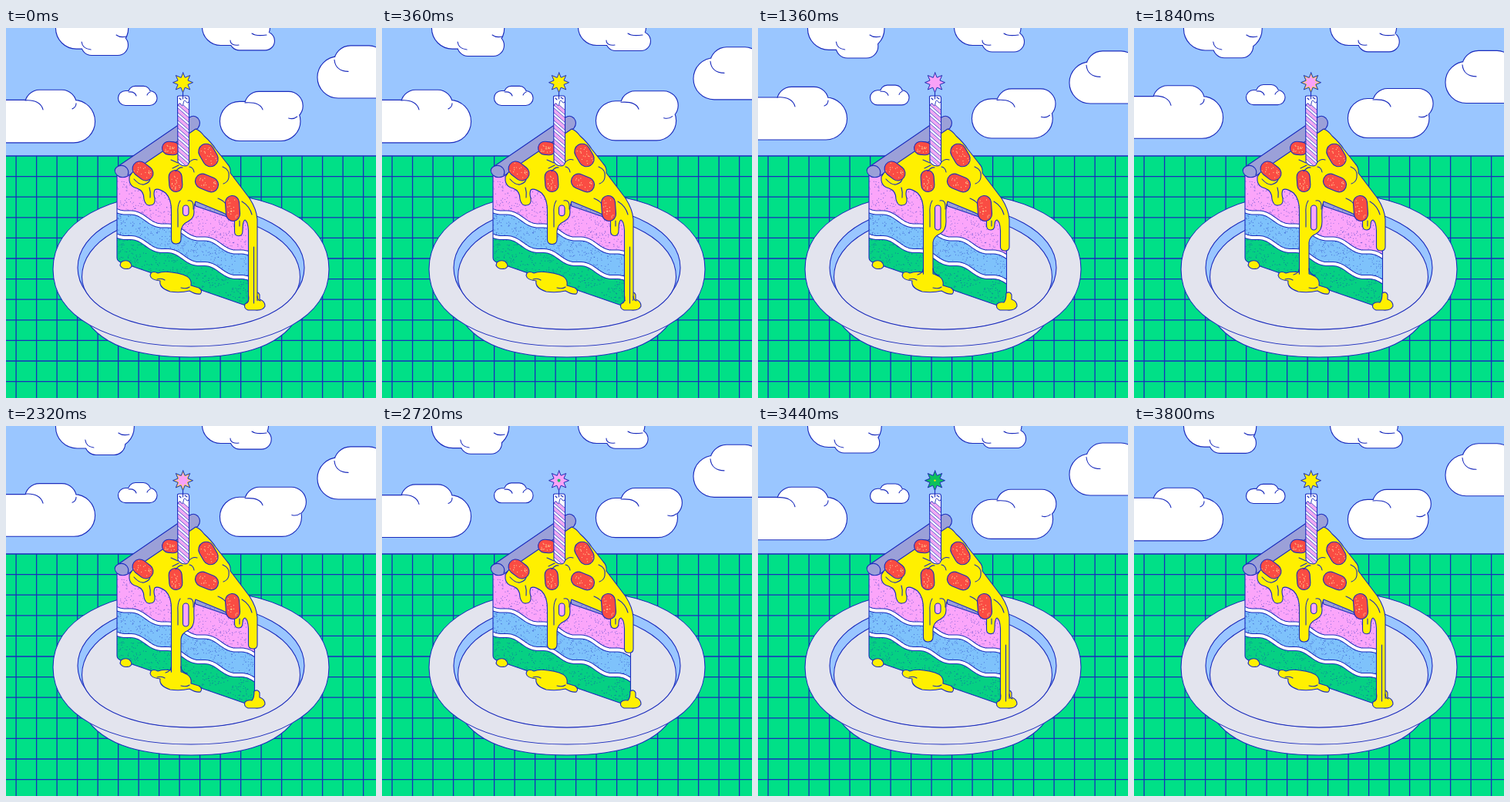
Write an HTML page with a canvas that moves like this. It is 480 by 480 pixels and loops after 3.84 s.

```html
<!DOCTYPE html>
<html lang="en">
<head>
<meta charset="utf-8">
<title>Pizza cake</title>
<style>
html, body { margin: 0; width: 100%; height: 100%; overflow: hidden; background: #9ac6ff; }
canvas { display: block; width: 480px; height: 480px; }
</style>
</head>
<body>
<canvas id="stage" width="480" height="480"></canvas>
<script>
const ctx = document.getElementById('stage').getContext('2d');
const LOOP = 3840, STEP = 40, TAU = Math.PI * 2;
const INK = '#1b2cbd', SKY = '#9ac6ff', GRASS = '#00e087', PLATE = '#e3e4ee';
const YELLOW = '#fff000', PINK = '#fba5fa', BLUE = '#7ec2fb', MINT = '#06d083';
const RED = '#fa4c43', CRUST = '#9ba0d8';

ctx.lineJoin = ctx.lineCap = 'round';

function paint(shape, fill, width = 1.1) {
  const path = typeof shape === 'string' ? new Path2D(shape) : shape;
  if (fill) { ctx.fillStyle = fill; ctx.fill(path); }
  if (width) { ctx.strokeStyle = INK; ctx.lineWidth = width; ctx.stroke(path); }
}

function seeded(seed) {
  return () => (seed = (seed * 16807) % 2147483647) / 2147483647;
}

// 0 at `shift` ms, 1 half a loop later
const sway = (t, shift) => (1 - Math.cos((t - shift) / LOOP * TAU)) / 2;

function tween(t, stops) {
  for (let i = 1; i < stops.length; i++) {
    const [t0, a] = stops[i - 1], [t1, b] = stops[i];
    if (t <= t1) return a + (b - a) * (1 - Math.cos(Math.PI * (t - t0) / (t1 - t0))) / 2;
  }
  return stops[stops.length - 1][1];
}

// Each puff is a pill given by left, top, right, bottom
function cloud(puffs, folds) {
  const path = new Path2D();
  for (const [l, top, r, b] of puffs) path.roundRect(l, top, r - l, b - top, (b - top) / 2);
  paint(path, null, 2.2);
  ctx.fillStyle = '#fff';
  ctx.fill(path);
  paint(folds, null);
}

function drawClouds(t) {
  const p = sway(t, 180), q = sway(t, -420), s = sway(t, -170), r = sway(t, 580);

  cloud([[65, -26, 158 + 8 * p, 26.5 + 2 * p], [98 + 5 * p, 9, 158 - 4 * p, 34.5 + 4 * q]],
    `M${98 + 5 * p} 18 Q${99 + 5 * p} 27 ${110 + 4 * p} 28 M${143 + 3 * p} 9 Q${148 + 3 * p} 13 ${156 + 4 * p} 11`);

  cloud([[255, -25, 342 - 2 * p, 22], [291, 5, 348 - 4.5 * p, 28 + 2.5 * q]],
    'M291 16 C291 21 296 23 302 22 M319 7 Q324 11 338 9');

  const y = 22.5 + 8 * q;
  cloud([[404.5, y + 14, 530, y + 67], [426, y, 492, y + 42]],
    `M426 ${y + 18} C427 ${y + 28} 434 ${y + 33} 444 ${y + 33}`);

  const top = 81 - 6 * p;
  cloud([[-40, 94 - 5 * p, 115, 148.5 - 6 * p], [25, top, 91, top + 37]],
    `M25 ${top + 13} C38 ${top + 12} 46 ${top + 17} 48 ${top + 25}
     M91 ${top + 17} Q91 ${top + 22} 86 ${top + 24}`);

  const dy = -4 * s, edge = 383.5 + 5.5 * r;
  cloud([[278, 96 + dy, 381 + 2 * r, 146 + dy], [310, 83 + dy, edge, 119 + dy / 2]],
    `M310 ${97 + dy} C324 ${96 + dy} 331 ${100 + dy} 333 ${106 + dy}
     M${edge - 7} ${115 + dy / 2} Q${edge - 12} ${119 + dy / 2} ${edge - 18} ${117 + dy / 2}`);

  cloud([[146, 82 - p, 195.5, 100 - p], [159, 76 - 2 * p, 187, 93 - p]],
    `M159 ${83 - p} Q167 ${82 - p} 169 ${88 - p} M187 ${83 - p} Q184 ${84 - p} 183 ${87 - p}`);
}

// Oval around x = 240; `k` sets how full its shoulders are
function oval(rx, cy, top, bottom, k) {
  const x = 240 - rx, right = 240 + rx, up = cy - (cy - top) * k, down = cy + (bottom - cy) * k;
  return `M${x} ${cy} C${x} ${up} ${240 - rx * k} ${top} 240 ${top} S${right} ${up} ${right} ${cy}
    C${right} ${down} ${240 + rx * k} ${bottom} 240 ${bottom} S${x} ${down} ${x} ${cy}Z`;
}

function drawTable() {
  ctx.fillStyle = GRASS;
  ctx.fillRect(0, 166, 480, 314);
  let lines = '';
  for (let x = 13.1; x < 480; x += 26.5) lines += `M${x} 166V480`;
  for (let y = 166; y < 480; y += 26.6) lines += `M0 ${y}H480`;
  paint(lines, null, 1.3);

  paint('M98 368 C118 412 170 427 240 427 S362 412 382 368Z', PLATE);
  paint(oval(179, 313, 213, 413, 0.61), PLATE);
  paint(oval(147, 311, 230, 391, 0.57), SKY);
  paint(oval(141.5, 323, 242, 391, 0.57), PLATE);
}

const waveY = (x, base) => base + 0.355 * (x - 144) - 2.8 * Math.sin((x - 158) / 48 * TAU);

function wave(base) {
  let path = `M144 ${waveY(144, base)}`;
  for (let x = 147; x <= 321; x += 3) path += `L${x} ${waveY(x, base)}`;
  return path + `L322.500 ${waveY(322.5, base)}`;
}

const FACE = new Path2D('M144 191 L160 190 L246 220 L322.500 247 V364 L149 304 Q144 302 144 298Z');
const WAVES = [wave(234.5), wave(267)];
const SPECKS = new Path2D();
{
  const rnd = seeded(77);
  for (let i = 0; i < 1200; i++) {
    const x = 144 + rnd() * 179, y = 192 + (x - 144) * 0.34 + rnd() * 112;
    SPECKS.rect(x, y, 0.9, 0.9);
  }
}

function drawSlice() {
  paint(FACE, PINK, 0);
  ctx.save();
  ctx.clip(FACE);
  paint(WAVES[0] + 'V380H144Z', BLUE, 0);
  paint(WAVES[1] + 'V380H144Z', MINT, 0);
  paint('M243 219 L318 242 L316 251 Q306 240 296 248 L246 231Z', CRUST);
  ctx.fillStyle = 'rgba(27,44,189,.6)';
  ctx.fill(SPECKS);
  for (const line of WAVES) {
    paint(line, null, 6);
    ctx.strokeStyle = '#fff';
    ctx.lineWidth = 4;
    ctx.stroke(new Path2D(line));
  }
  ctx.restore();
  paint(FACE);

  paint('M143 181 L238 116 Q244 112 249 117 Q254 123 249 130 L158 192 Q150 196 144 191 Q139 185 143 181Z', CRUST);
  paint('M146 179 Q153 177 157 182 Q160 186 158 191', null);
}

function drawPuddles() {
  paint('M149 304 Q154 300 160 303 Q166 309 160 312 Q151 314 148 308Z', YELLOW);
  paint('M188 318 Q191 315 197 318 Q204 315 215 317 Q233 319 238 325 Q241 329 240 334 L250 337 Q256 341 252 345 Q246 346 238 341 Q226 344 213 342 Q198 337 200 328 Q188 327 187 321Z', YELLOW);
  paint('M196 326 Q202 324 206 327 M227 337 Q234 339 238 336', null);
  paint('M322 344 Q327 341 329 346 V352 Q336 354 336 361 Q333 367 323 366 H314 Q308 364 310 358 Q313 355 319 356 Q322 353 322 344Z', YELLOW);
}

function drawCheese(t) {
  const mid = tween(t, [[0, 280], [320, 280], [720, 301], [1080, 327], [2440, 327], [2840, 280], [LOOP, 280]]);
  const right = tween(t, [[0, 359], [280, 359], [720, 320], [1200, 289], [2560, 289], [3120, 317], [3480, 359], [LOOP, 359]]);
  const web = tween(t, [[0, 0], [320, 0], [1200, 1], [2160, 1], [2920, 0], [LOOP, 0]]);
  const tip = 262 + (right - 289) / 9;

  const body = new Path2D(`M160 193 Q165 183 181 175 L246 131 Q252 133 257 140
    Q267 149 272 157 L287 176 Q292 181 291 188 L316 221 Q325 235 326 248
    V${right - 5} Q326 ${right} 320.500 ${right} Q314.500 ${right} 314.500 ${right - 5}
    V263 Q314 251 310 249 Q307 250 307 ${tip - 7} Q307 ${tip} 302 ${tip} Q296 ${tip} 296.500 ${tip - 7} V248
    Q288 243 280 239 L246 225 Q243 232 244 ${239 + 12 * web}
    Q244 ${247 + 16 * web} 236 ${251 + 16 * web} Q227.500 ${255 + 16 * web} 227 ${264 + 14 * web}
    V${mid - 6} Q227 ${mid} 220.500 ${mid} Q214.500 ${mid} 214.500 ${mid - 6}
    V239 Q215 222 207 214 Q197 207 193 210 Q191 214 193 221 Q194 230 187 230
    Q181 231 179 222 Q179 211 170 208 Q161 206 160 198Z`);
  paint(body, YELLOW);

  ctx.fillStyle = YELLOW;
  if (mid > 317) {
    const flare = Math.min(1, (mid - 317) / 8);
    ctx.beginPath();
    ctx.ellipse(221, 326, 13 * flare, 7.5, 0, 0, TAU);
    ctx.fill();
    paint('M214.500 312 Q214 318 207 320 M227 312 Q227 319 235 321', null);
  }
  if (right > 352) {
    ctx.beginPath();
    ctx.ellipse(321, 358.5, 8, 6, 0, 0, TAU);
    ctx.fill();
    paint('M314.500 347 Q316 354 312 357 M326 348 Q326 353 330 354 M321.500 284 V357', null);
  }

  const hole = new Path2D();
  hole.roundRect(229.5, 230, 7.5, 13.5 + 18.5 * web, 3.7);
  paint(hole, PINK);
  paint(`M226 224 Q222 230 223 242 V258 M236 224 Q244 222 243 235
    M166 196 Q173 204 179 203 Q188 200 187 194 M186 207 Q188 213 187 220
    M281 180 Q291 184 289 194 Q288 200 282 202 M306 225 Q316 231 319 242
    M275 221 Q282 224 284 227 M303 250 V257`, null);
}

// x, y, length, thickness, angle
const SAUSAGES = [
  [177.5, 185.5, 29, 19, 0.65], [214, 156, 23, 17, 0.1], [220, 198.5, 28, 17, 1.5],
  [262.5, 165, 31, 20, 1.05], [260.5, 201, 31, 19, 0.4], [294, 234, 33, 18, 1.5]
];

function drawSausages() {
  const rnd = seeded(31);
  for (const [x, y, len, thick, angle] of SAUSAGES) {
    ctx.save();
    ctx.translate(x, y);
    ctx.rotate(angle);
    const pill = new Path2D();
    pill.roundRect(-len / 2, -thick / 2, len, thick, thick / 2);
    paint(pill, RED);
    ctx.fillStyle = '#ffc98f';
    for (let i = 0; i < 18; i++) {
      ctx.fillRect((rnd() - 0.5) * (len - 7), (rnd() - 0.5) * (thick - 6), 1.1, 1.1);
    }
    ctx.restore();
  }
}

function drawCandle() {
  paint('M214 171 L223 175 M216 182 L224 178 M220 186 Q225 180 229 181 M238 180 Q243 181 244 187 M237 175 Q242 169 248 171', null);
  const body = new Path2D('M222.500 90 Q222 88 225 88 H235 Q237.500 88 237.500 91 V174 Q237 179 232 179 Q224 178 223 173Z');
  paint(body, '#fff', 0);
  ctx.save();
  ctx.clip(body);
  for (let y = 93; y < 185; y += 10) paint(`M222 ${y} L238 ${y + 14} V${y + 20} L222 ${y + 6}Z`, '#f1a9f3', 0.7);
  paint('M222 87 H238 V94 Q236 99 234 96 Q231 91 230 98 Q229 103 227 99 Q225 95 222 103Z', '#fff', 0.9);
  ctx.restore();
  paint(body);
  paint('M229.500 79 V92 M225 91 L227 93 M232 90 L235 92', null);
}

function star(size) {
  const path = new Path2D();
  for (let i = 0; i < 16; i++) {
    const a = i / 16 * TAU - Math.PI / 2, r = size * (i % 2 ? 7 : 13);
    path.lineTo(229.5 + r * Math.cos(a), 70.7 + r * Math.sin(a));
  }
  path.closePath();
  return path;
}

function drawStar(t) {
  const layers = [
    ['#f9a2f7', tween(t, [[0, 0], [280, 0], [720, 0.75], [1200, 1], [1480, 1], [1840, 0.8], [2400, 0.8], [2600, 1], [LOOP, 1]])],
    ['#0cc05c', tween(t, [[0, 0], [2520, 0], [3120, 0.85], [3320, 1], [LOOP, 1]])],
    [YELLOW, tween(t, [[0, 0], [3320, 0], [LOOP, 1]])]
  ];
  paint(star(1), YELLOW, 0);
  for (const [color, size] of layers) if (size > 0) paint(star(size), color, 0);
  paint(star(1), null, 1);
}

function frame(now) {
  const t = Math.floor((now % LOOP) / STEP) * STEP;
  ctx.fillStyle = SKY;
  ctx.fillRect(0, 0, 480, 480);
  drawClouds(t);
  drawTable();
  drawSlice();
  drawPuddles();
  drawCheese(t);
  drawSausages();
  drawCandle();
  drawStar(t);
}

let start;
function tick(now) {
  start ??= now;
  frame(now - start);
  requestAnimationFrame(tick);
}
frame(0);
requestAnimationFrame(tick);
</script>
</body>
</html>
```
